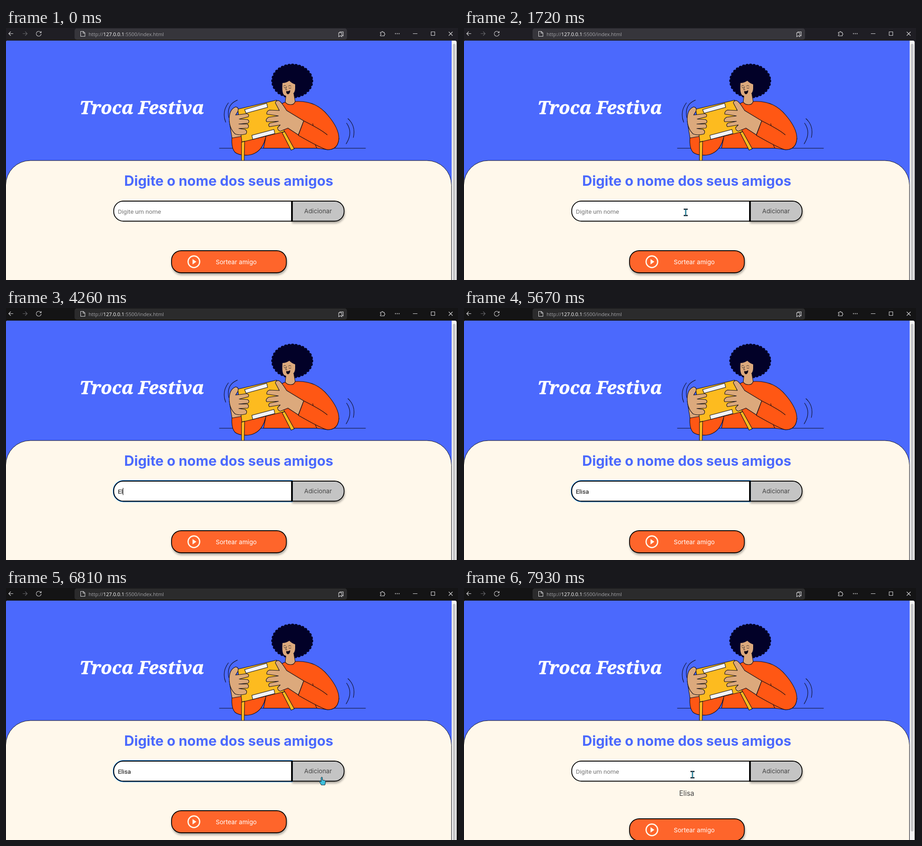
An HTML page for the animation above (8000 ms loop, 1002 by 559 pixels).

```html
<!DOCTYPE html>
<html lang="pt-BR">
<head>
<meta charset="utf-8">
<title>Sorteio</title>
<style>
  html, body { margin: 0; width: 100%; height: 100%; overflow: hidden; background: #1f1e24; }
  svg { display: block; width: 1002px; height: 559px; }
  text { font-family: Inter, sans-serif; font-optical-sizing: none; }
  .title { font: italic 700 40px "Noto Serif", serif; fill: #fff; stroke: #fff; stroke-width: .7; }
  .url { font: 11.1px "Open Sans", sans-serif; fill: #a2a2a6; }
  .field { font: 13.65px Roboto, sans-serif; }
  .mid { text-anchor: middle; }
  .icon { fill: none; stroke: #d6d6d8; stroke-width: 1.1; }
  .art { stroke: #0b0b18; stroke-width: 1.1; stroke-linejoin: round; stroke-linecap: round; }
  .none { fill: none; }
  .skin { fill: #dca97c; }
  .shirt { fill: #ff5714; }
  .drum { fill: #fdbb1f; }
  .band { fill: #f4f4f6; }
  .shadow { filter: drop-shadow(1px 4px 2px rgba(0, 0, 0, .3)); }
  .box { stroke: #000; stroke-width: 1.8; }
</style>
</head>
<body>
<svg viewBox="0 0 1002 559">
  <!-- browser bar -->
  <rect id="bar" width="1002" height="559"/>
  <rect id="pill" x="152" y="1" width="604" height="25" rx="5"/>
  <g class="icon">
    <path d="M16 12.5H6M10.5 8L6 12.5L10.5 17"/>
    <path d="M37 12.5H47M42.5 8L47 12.5L42.5 17" stroke="#66666a"/>
    <path d="M77.3 10A5.5 5.5 0 1 0 78 13M78 7V10.5H74.5"/>
    <path d="M165.5 7.5H171.5L175 11V18.5H165.5ZM171 7.5V11.5H175"/>
    <path d="M737.5 10.5H744.5V19.5L741 17L737.5 19.5ZM740 10V8.5H747.5V17.5L745 16"/>
    <path d="M830 9.5H832.8A1.6 1.6 0 1 1 836 9.5H838.5V12A1.6 1.6 0 1 1 838.5 15.200V17.500H830V15.200A1.6 1.6 0 1 0 830 12Z"/>
    <path d="M862.500 12.500H872.500" stroke-width="1.8" stroke-dasharray="1.8 2.2"/>
    <path d="M902 12.5H912M942.5 8.5H950.5V16.5H942.5ZM981.500 8.500L990 17M990 8.500L981.500 17"/>
  </g>
  <text class="url" x="183" y="17.5">http://<tspan fill="#fff">127.0.0.1</tspan>:5500/index.html</text>

  <!-- page -->
  <rect y="28" width="999" height="540" rx="4" fill="#f3f3f3"/>
  <path d="M0 559V32Q0 28 4 28H988V559Z" fill="#4b69fd"/>
  <rect id="thumb" x="990.5" y="35" width="6" rx="3" fill="#c6c6c8"/>
  <text class="title" x="163" y="191">Troca Festiva</text>

  <g class="art">
    <path class="none" d="M473 266.8H797M493 166Q478 186 487 209M513 160Q488 170 494 199M758 201Q776 217 770 243M755 211Q770 232 754 257"/>
    <g fill="#020128" stroke="#020128">
      <ellipse cx="634.5" cy="117.5" rx="42.5" ry="34.5"/>
      <ellipse cx="634.5" cy="117.5" rx="42.5" ry="34.5" stroke-width="8" stroke-dasharray="0 7.6"/>
    </g>
    <path class="shirt" d="M501 243Q499 267 508 276Q517 283 537 282Q562 279 572 254L578 236L523 238Z"/>
    <path class="shirt" d="M571 266.5L580 222Q594 172 620 164L641 163Q686 160 713 193Q738 222 738 245Q736 270 713 270L689 266.5Z"/>
    <path class="skin" d="M621 146L619 164Q622 170 631 170Q639 170 641 163L638 145Z"/>
    <path class="skin" stroke="none" d="M613 122Q611 145 617 149Q625 154 634 148Q641 143 641 134V125Q634 123 628 117Q621 122 613 122Z"/>
    <path class="none" stroke-width=".8" d="M615 129Q617 126 620 128M626 129Q629 126 632 129M616 132Q618 134 620 132M627 133Q629 135 632 133M622 130L620 137H623"/>
    <path fill="#100818" stroke="none" d="M621 140Q626 141 630 138Q630 146 625 147Q621 146 621 140Z"/>
    <path class="skin" d="M495 207L501 244L524 240L519 216Z"/>
    <path class="drum" d="M514 180L600 160L617 230L523 253ZM522 253L529 251L528 296H522ZM612 232L618 230L639 268L632 271Z"/>
    <path class="band" d="M529 181L578 167L580 176L532 189ZM545 238L594 225L596 234L547 247Z"/>
    <path class="skin" d="M495 199Q496 180 509 175Q517 176 514 185L509 193L534 190Q540 192 537 197L517 202L535 203Q541 206 537 211L516 213L535 213Q540 217 536 222L516 223L530 225Q536 229 532 235Q518 239 508 235Q494 222 495 199Z"/>
    <path class="skin" d="M660 206L622 183Q610 163 604 161Q598 161 597 166L606 183L584 182Q577 185 578 191L604 195L582 198Q574 203 578 208L604 207L585 211Q580 215 584 219L608 215L602 221Q602 227 608 229L625 222L648 237Z"/>
    <path class="shirt" stroke="none" d="M660 206L712 237L738 246Q735 270 713 270Q702 269 648 238Z"/>
    <path class="none" d="M712 237Q700 226 660 206L648 238Q702 269 713 270Q736 270 738 245M680 212L681 217M686 260L689 266.5"/>
  </g>

  <rect x="-.5" y="294" width="988" height="400" rx="54.6" fill="#fff8eb" stroke="#0b0b18"/>
  <text class="mid" x="493.7" y="350" font-size="30.7" font-weight="700" fill="#4b69fd">Digite o nome dos seus amigos</text>

  <path class="box shadow" d="M634 384H728A21.3 21.3 0 0 1 749.5 405.3V407.2A21.3 21.3 0 0 1 728 428.5H634Z" fill="#c4c4c4"/>
  <path id="ring" d="M635 382.5H260A22.5 22.5 0 0 0 237.5 405V407.5A22.5 22.5 0 0 0 260 430H635Z" fill="#0d7ade" stroke="#0d7ade"/>
  <path class="box" d="M633 384H260A21.3 21.3 0 0 0 238.8 405.3V407.2A21.3 21.3 0 0 0 260 428.5H633Z" fill="#fff"/>
  <path d="M634 383V429.400" stroke="#000" stroke-width="3.6"/>
  <text class="mid" x="691.7" y="411" font-size="13.65" fill="#444">Adicionar</text>
  <text id="hint" class="field" x="248" y="412" fill="#757575">Digite um nome</text>
  <text id="typed" class="field" x="248" y="412"></text>
  <rect id="caret" y="399" width="1" height="16"/>
  <text id="item" class="mid" x="493.7" y="461" font-size="15.36" fill="#444"></text>

  <g id="draw">
    <rect id="face" class="box shadow" x="367" y="494" width="254.5" height="49" rx="21.3"/>
    <circle cx="416.5" cy="518.5" r="12.8" fill="none" stroke="#fff8eb" stroke-width="2.8"/>
    <path d="M413.5 512.5V524.5L422 518.5Z" fill="#fff8eb"/>
    <text class="mid" x="510.3" y="524" font-size="13.65" fill="#fff">Sortear amigo</text>
  </g>

  <g id="pointer" stroke="#10202c" stroke-linejoin="round">
    <path id="arrow" d="M0 0V14L3.5 11L6 15.8L8.3 14.7L6.2 10.3H10Z" fill="#3fc0dc"/>
    <path id="hand" d="M-1.5 1.5Q0 -1 1.5 1.5V7L6.5 8Q9 8.5 8.5 11L7 18H-1L-5 11Q-5.5 8.5 -3.5 9L-1.5 11Z" fill="#3fc0dc"/>
    <g id="beam" fill="none">
      <path d="M-4 -7H5M-4 7H5M.5 -7V7" stroke-width="2.6"/>
      <path d="M.5 -6.500V6.500" stroke="#3fc0dc" stroke-width="1.6"/>
    </g>
  </g>
</svg>
<script>
const LOOP = 8000, NAME = "Elisa";
const FOCUS = 1920, TYPING = 3930, RETURN = 6480, BLUR = 7220, ADDED = 7290;
const keys = [TYPING, 4260, 4940, 5140, 5340];
const blinks = [FOCUS, 2470, 3000, 3530, TYPING, 4610, 4940, 5670, 6140, 6680];

// start, end, steps, from, to, easing power
const moves = [
  [580, 930, 6, [938, 541], [510, 431], 2],
  [1260, 1720, 6, [510, 431], [491, 409], 1],
  [6340, 6810, 8, [500, 525], [700, 419], 1],
  [7580, 7930, 6, [700, 419], [506, 414], 1.5]
];

const el = id => document.getElementById(id);
const show = (id, on) => el(id).setAttribute("visibility", on ? "visible" : "hidden");
const count = (times, t) => times.filter(k => k <= t).length;
const mix = (a, b, u) => a.map((v, i) => v + (b[i] - v) * u);
const rgb = c => `rgb(${c.map(Math.round)})`;
const clamp = u => Math.max(0, Math.min(1, u));
const inside = ([x, y], l, t, r, b) => x > l && x < r && y > t && y < b;

function pointerAt(t) {
  const [start, end, steps, from, to, power] = moves.filter(m => m[0] <= t).pop() || moves[0];
  const step = Math.floor((t - start) / (end - start) * (steps - 1) + 1e-6);
  const u = clamp(step / (steps - 1));
  return mix(from, to, 1 - (1 - u) ** power);
}

function render(t) {
  const active = clamp((Math.floor((t - FOCUS) / 80) + 1) / 3);
  el("bar").setAttribute("fill", rgb(mix([31, 30, 36], [20, 20, 21], active)));
  el("pill").setAttribute("fill", rgb(mix([54, 53, 59], [43, 43, 44], active)));

  const added = t >= ADDED;
  const text = added ? "" : NAME.slice(0, count(keys, t));
  el("typed").textContent = text;
  el("item").textContent = added ? NAME : "";
  show("hint", !text);
  show("ring", t >= FOCUS && t < BLUR);
  show("caret", count(blinks, t) % 2);
  el("caret").setAttribute("x", Math.round(248 + (text ? el("typed").getComputedTextLength() : 0)));
  el("thumb").setAttribute("height", added ? 505 : 530);

  const p = pointerAt(t);
  const shift = added ? 18 : 0;
  const overDraw = inside(p, 366, 493 + shift, 622, 544 + shift);
  const overField = inside(p, 238, 384, 634, 430);
  const overAdd = inside(p, 634, 384, 750, 430);
  el("draw").setAttribute("transform", `translate(0 ${shift})`);
  el("face").setAttribute("fill", overDraw ? "#e45820" : "#fe652b");

  const visible = t >= 580 && (t < TYPING || t >= RETURN);
  const kind = overField ? "beam" : overDraw || overAdd ? "hand" : "arrow";
  for (const k of ["arrow", "hand", "beam"]) show(k, visible && k === kind);
  el("pointer").setAttribute("transform", `translate(${p.map(Math.round)})`);
}

const begin = performance.now();
function frame() {
  render((performance.now() - begin) % LOOP);
  requestAnimationFrame(frame);
}
frame();
</script>
</body>
</html>
```
